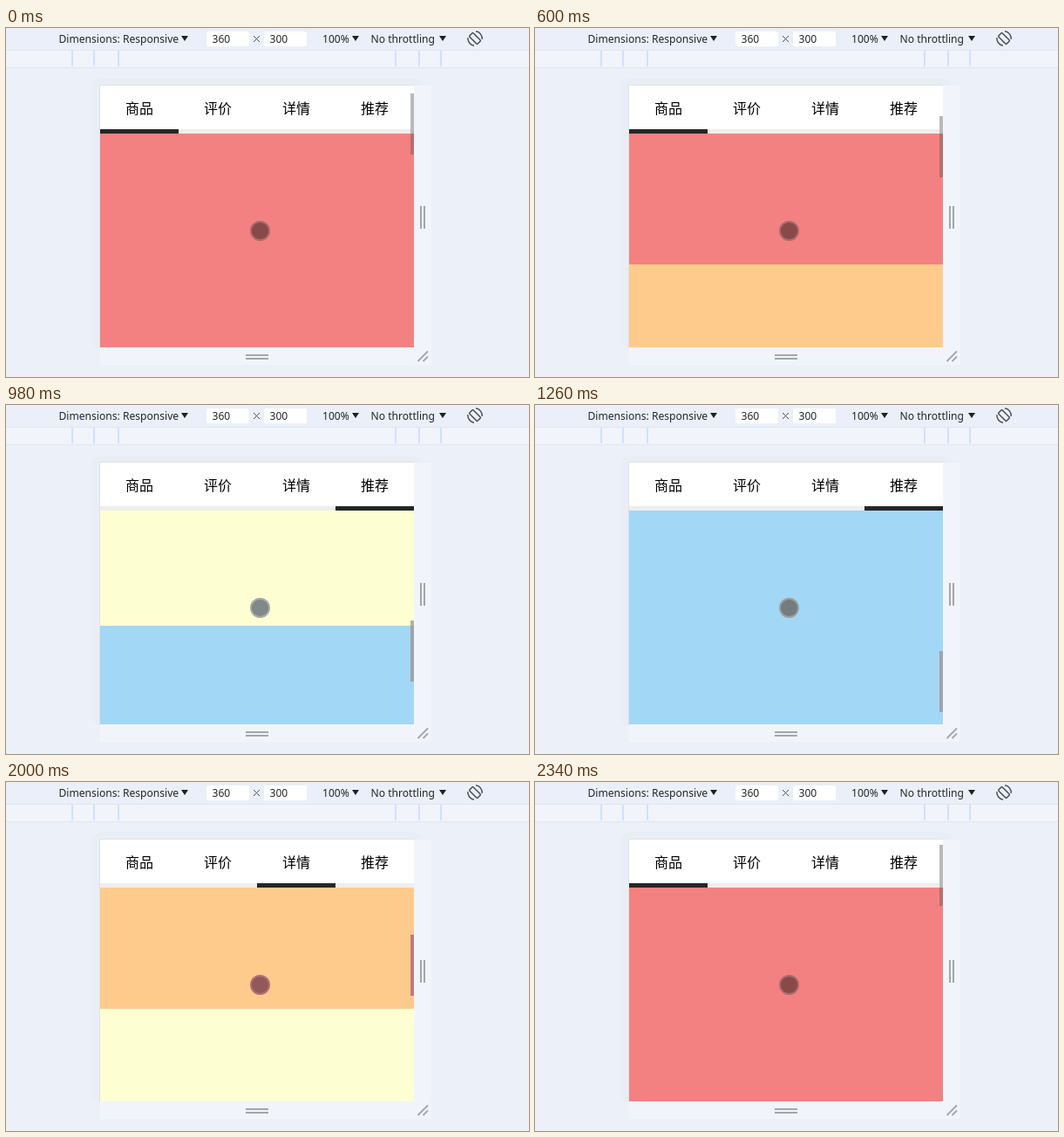
An HTML page with a canvas that plays this animation: 600x400 px, repeating every 2390 ms.

```html
<!DOCTYPE html>
<html lang="zh-CN">
<head>
<meta charset="utf-8">
<title>Scroll tabs</title>
<style>
html, body { margin: 0; width: 100%; height: 100%; overflow: hidden; background: #ebf0f9; }
canvas { display: block; width: 600px; height: 400px; }
</style>
</head>
<body>
<canvas id="stage" width="600" height="400"></canvas>
<script>
const ctx = document.getElementById('stage').getContext('2d');
const LOOP = 2390;
const UI = '12.1px "Noto Sans", "Open Sans", sans-serif';
const TAB = '16px "Noto Sans CJK SC", "Noto Sans CJK", "Noto Sans CJK JP", sans-serif';
const LEFT = 108, TOP = 66, WIDTH = 360, HEIGHT = 300, HEAD = 55, SECTION = 300;
const THUMB = 70, THUMB_RATIO = 0.2358;

const sections = [
  { tab: '商品', bg: '#f38181', dot: '#884949', ring: '#aa6a6a', thumb: '#b56f6f' },
  { tab: '评价', bg: '#fecb8c', dot: '#905a5a', ring: '#b57070', thumb: '#b97c7c' },
  { tab: '详情', bg: '#fdffd3', dot: '#80888a', ring: '#a9a9a9', thumb: '#b2b2a4' },
  { tab: '推荐', bg: '#a2d7f6', dot: '#747c80', ring: '#9e9ea0', thumb: '#a0a3a8' }
];

// Moments at which the screen refreshes while scrolling
const ticks = [
  0, 420, 470, 510, 560, 610, 650, 700, 750, 800, 840, 890, 930,
  980, 1030, 1070, 1120, 1170, 1210, 1260,
  1640, 1680, 1730, 1770, 1820, 1870, 1910, 1960, 2000, 2060, 2110, 2160,
  2200, 2250, 2300, 2340
];

// [time, scroll offset]
const down = [[420, 42], [560, 150], [750, 429], [980, 768], [1120, 928], [1170, 941], [1260, 916]];
const up = [[1640, 908], [1770, 781], [2000, 461], [2160, 224], [2250, 100], [2340, 25]];

function curve(keys, t) {
  const last = keys.length - 1;
  if (t >= keys[last][0]) return keys[last][1];
  let i = 0;
  while (t >= keys[i + 1][0]) i++;
  const slope = k => {
    const a = keys[Math.max(0, k - 1)], b = keys[Math.min(last, k + 1)];
    return (b[1] - a[1]) / (b[0] - a[0]);
  };
  const [t0, v0] = keys[i], [t1, v1] = keys[i + 1];
  const d = t1 - t0, u = (t - t0) / d, w = 1 - u;
  return v0 * (1 + 2 * u) * w * w + slope(i) * d * u * w * w
       + v1 * u * u * (3 - 2 * u) - slope(i + 1) * d * u * u * w;
}

function scrollAt(time) {
  const t = ticks.filter(k => k <= time).pop();
  if (t < 420) return 38;
  return Math.round(t < 1640 ? curve(down, t) : curve(up, t));
}

function rect(x, y, w, h, color) {
  ctx.fillStyle = color;
  ctx.fillRect(x, y, w, h);
}

function round(x, y, w, h, r, color) {
  ctx.fillStyle = color;
  ctx.beginPath();
  ctx.roundRect(x, y, w, h, r);
  ctx.fill();
}

function disc(x, y, r, color) {
  ctx.fillStyle = color;
  ctx.beginPath();
  ctx.arc(x, y, r, 0, Math.PI * 2);
  ctx.fill();
}

function line(x1, y1, x2, y2) {
  ctx.beginPath();
  ctx.moveTo(x1, y1);
  ctx.lineTo(x2, y2);
  ctx.stroke();
}

function text(str, x, y, font = UI, align = 'left', color = '#232629') {
  ctx.font = font;
  ctx.textAlign = align;
  ctx.fillStyle = color;
  ctx.fillText(str, x, y);
}

function caret(x) {
  ctx.fillStyle = '#202124';
  ctx.beginPath();
  ctx.moveTo(x, 9);
  ctx.lineTo(x + 8, 9);
  ctx.lineTo(x + 4, 15);
  ctx.fill();
}

function rotateIcon() {
  ctx.save();
  ctx.translate(538, 12);
  ctx.strokeStyle = '#4a4d50';
  ctx.lineWidth = 1.5;
  ctx.beginPath();
  ctx.arc(0, 0, 8.2, -1.45, 0.1);
  ctx.stroke();
  ctx.beginPath();
  ctx.arc(0, 0, 8.2, 1.7, 3.25);
  ctx.stroke();
  ctx.rotate(-Math.PI / 4);
  ctx.beginPath();
  ctx.roundRect(-3, -6.5, 6, 13, 1);
  ctx.stroke();
  ctx.restore();
}

function toolbar() {
  rect(0, 0, 600, 25, '#ebeff9');
  rect(0, 25, 600, 21, '#e1e6ef');
  rect(0, 26, 600, 19, '#f1f4fa');
  for (const x of [75, 100, 128, 446, 473, 498]) rect(x, 26, 2, 18, '#cfe1fd');

  round(230, 4, 49, 17, 2, '#fff');
  round(296, 4, 49, 17, 2, '#fff');
  text('Dimensions: Responsive', 60.5, 17);
  text('360', 236.5, 17);
  text('300', 302.5, 17);
  text('100%', 363, 17);
  text('No throttling', 418.5, 17);
  ctx.strokeStyle = '#505357';
  ctx.lineWidth = 1;
  line(284, 9, 291, 16);
  line(291, 9, 284, 16);
  [201, 397, 497].forEach(caret);
  rotateIcon();
}

function frame() {
  round(99, 58, 378, 309, 9, '#e9eef5');
  rect(107, 65, 361, 302, '#dfe1e6');
  rect(468, 66, 20, 320, '#f1f5fb');
  rect(108, 366, 380, 20, '#f1f5fb');
  for (const d of [0, 4]) {
    rect(475 + d, 204, 2, 26, '#a3a6aa');
    rect(275, 374 + d, 26, 2, '#a3a6aa');
  }
  ctx.strokeStyle = '#a3a6aa';
  ctx.lineWidth = 1.8;
  line(472.5, 382, 484, 370.5);
  line(478.5, 382, 484, 376.5);
}

function page(scroll) {
  const thumbY = Math.round(TOP + scroll * THUMB_RATIO);
  const bodyTop = TOP + HEAD, bottom = TOP + HEIGHT;
  const thumbPart = (y1, y2, color) => {
    const a = Math.max(y1, thumbY), b = Math.min(y2, thumbY + THUMB);
    if (b > a) rect(464, a, 4, b - a, color);
  };

  let under = sections[0];
  sections.forEach((s, i) => {
    const y = bodyTop + i * SECTION - scroll;
    const a = Math.max(bodyTop, y), b = Math.min(bottom, y + SECTION);
    if (b <= a) return;
    rect(LEFT, a, WIDTH, b - a, s.bg);
    thumbPart(a, b, s.thumb);
    if (a <= 232 && b > 232) under = s;
  });

  // A tab is active once 100px of its section is on screen
  const active = Math.max(0, Math.min(3, Math.floor((scroll + 145) / SECTION)));
  rect(LEFT, TOP, WIDTH, 50, '#fff');
  rect(LEFT, 116, WIDTH, 5, '#eeeeee');
  rect(LEFT + active * 90, 116, 90, 5, '#242728');
  sections.forEach((s, i) => text(s.tab, 153 + i * 90, 97.5, TAB, 'center', '#000'));
  thumbPart(TOP, bodyTop, '#b9b9b9');

  disc(291.5, 232.5, 11.5, under.ring);
  disc(291.5, 232.5, 9.6, under.dot);
}

function draw() {
  rect(0, 0, 600, 400, '#ebf0f9');
  toolbar();
  frame();
  page(scrollAt(performance.now() - start) );
}

let start = performance.now();
function loop() {
  const now = performance.now();
  while (now - start >= LOOP) start += LOOP;
  draw();
  requestAnimationFrame(loop);
}
loop();
</script>
</body>
</html>
```
